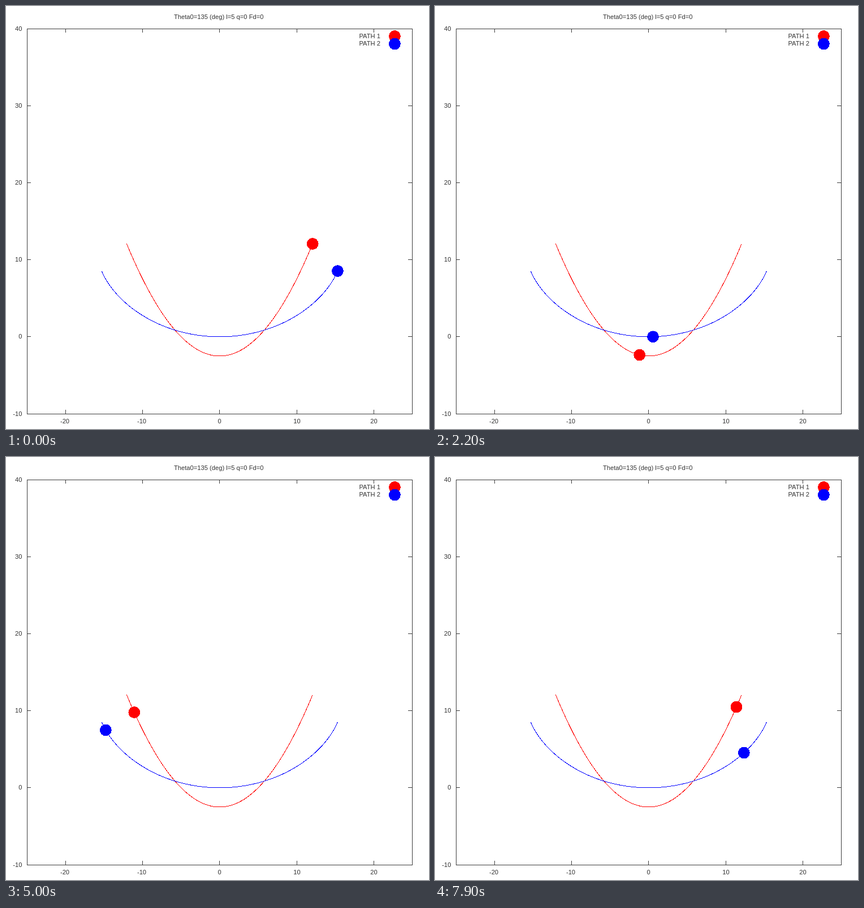
These frames come from a looping animation (748 by 748 pixels, 8000 ms). An HTML page:

```html
<!DOCTYPE html>
<html>
<head>
<meta charset="utf-8">
<style>
html, body { margin: 0; width: 100%; height: 100%; overflow: hidden; background: #fff; }
svg { display: block; width: 748px; height: 748px; font: 11.2px "Liberation Sans", Arial, sans-serif; }
path, circle { shape-rendering: crispEdges; }
path { fill: none; }
text { fill: #333; }
</style>
</head>
<body>
<svg id="plot" viewBox="0 0 748 748"></svg>
<script>
const svg = document.getElementById('plot');
const RED = '#f00', BLUE = '#00f', INK = '#3c3c3c';
const G = 9.8, L = 5, START = 135 * Math.PI / 180;
const FRAME = 100, LOOP = 8000;

const px = x => 377.8 + 13.62 * x;
const py = y => 584.9 - 13.62 * y;

function add(tag, attrs, text = '') {
  const el = document.createElementNS('http://www.w3.org/2000/svg', tag);
  for (const key in attrs) el.setAttribute(key, attrs[key]);
  el.textContent = text;
  return svg.appendChild(el);
}
const line = (d, stroke) => add('path', { d, stroke });
const label = (x, y, anchor, text) => add('text', { x, y, 'text-anchor': anchor }, text);
const ball = (fill, cx, cy) => add('circle', { cx, cy, r: 10.4, fill });

// Both tracks are symmetric about x = 0
const parabola = x => [x, x * x / (2 * L) - L / 2];
const cycloid = a => [L * (a + Math.sin(a)), L * (1 - Math.cos(a))];
const X0 = L * Math.SQRT1_2 / (1 + Math.cos(START));

function track(curve, end, color) {
  const points = [];
  for (let i = -100; i <= 100; i++) {
    const [x, y] = curve(end * i / 100);
    points.push(px(x).toFixed(2) + ' ' + py(y).toFixed(2));
  }
  line('M' + points.join('L'), color);
}

// Frictionless bead released at rest: x = X0 cos(phase)
function parabolaAt(t) {
  const rate = p => Math.sqrt(G / L / (1 + (X0 * Math.cos(p) / L) ** 2));
  const dt = 0.01;
  let phase = 0;
  for (let i = Math.round(t / dt); i > 0; i--) {
    phase += dt * rate(phase + dt / 2 * rate(phase));
  }
  return parabola(X0 * Math.cos(phase));
}

// Arc length along a cycloid is simple harmonic
function cycloidAt(t) {
  const s = Math.sin(START / 2) * Math.cos(Math.sqrt(G / (4 * L)) * t);
  return cycloid(2 * Math.asin(s));
}

line('M37.5 40.5H718.5V721.5H37.5Z', INK);
for (let v = -20; v <= 20; v += 10) {
  const x = Math.floor(px(v)) + 0.5;
  line(`M${x} 721V714M${x} 41V47`, INK);
  label(v < 0 ? x - 1.5 : x, 738, 'middle', v);
}
for (let v = -10; v <= 40; v += 10) {
  const y = Math.floor(py(v)) + 0.5;
  line(`M38 ${y}H44M718 ${y}H711`, INK);
  label(28.4, y + 3.5, 'end', v);
}
label(376.2, 23, 'middle', 'Theta0=135 (deg) l=5 q=0 Fd=0');
label(662, 57, 'end', 'PATH 1');
label(662, 70, 'end', 'PATH 2');

track(parabola, X0, RED);
track(cycloid, START, BLUE);
ball(RED, 687.4, 53.5);
ball(BLUE, 687.4, 67);
const redBall = ball(RED, 0, 0);
const blueBall = ball(BLUE, 0, 0);

function place(el, [x, y]) {
  el.setAttribute('cx', px(x));
  el.setAttribute('cy', py(y));
}

function draw(now) {
  const t = Math.floor(now % LOOP / FRAME) * FRAME / 1000;
  place(redBall, parabolaAt(t));
  place(blueBall, cycloidAt(t));
}

const begin = performance.now();
function tick() {
  draw(performance.now() - begin);
  requestAnimationFrame(tick);
}
tick();
</script>
</body>
</html>
```
